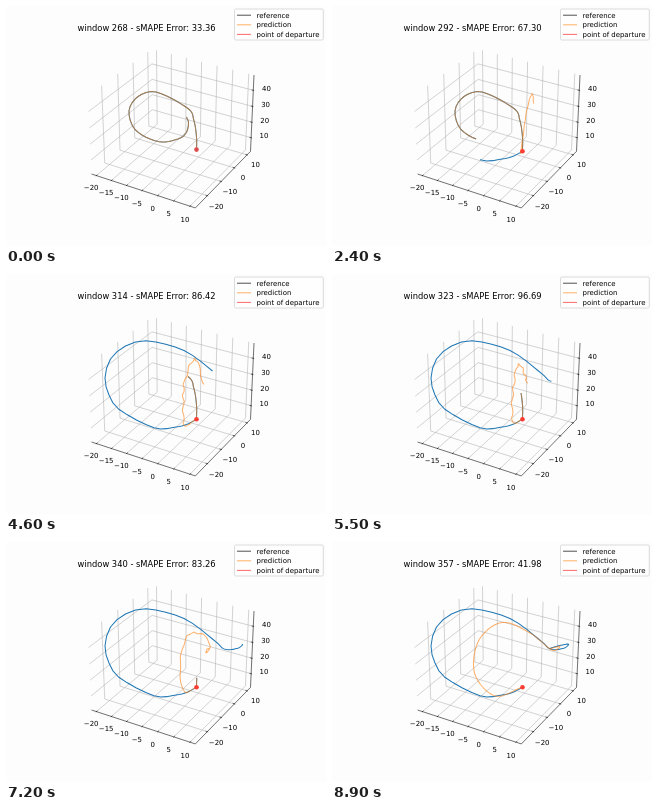
An HTML page for the animation above (9 s loop, 320 by 240 pixels).

```html
<!DOCTYPE html>
<html lang="en">
<head>
<meta charset="utf-8">
<title>Forecast window</title>
<style>
  html, body { margin: 0; width: 100%; height: 100%; overflow: hidden; background: #fdfdfd; }
  svg { display: block; width: 320px; height: 240px; }
  text { font-family: "DejaVu Sans", sans-serif; font-size: 6.94px; fill: #000; }
  #title { font-size: 8.33px; }
  .mid { text-anchor: middle; }
  .grid { stroke: #b0b0b0; stroke-width: .56; fill: none; }
  .axis { stroke: #000; stroke-width: .56; fill: none; }
  .curve { stroke-width: 1.04; fill: none; stroke-linejoin: round; }
  .ref { stroke: #1f77b4; }
  .pred { stroke: #ff7f0e; stroke-opacity: .6; }
  .start { stroke: #f33; stroke-opacity: .8; }
</style>
</head>
<body>
<svg viewBox="0 0 320 240">
  <g id="axes"></g>
  <path id="ref" class="curve ref"/>
  <path id="pred" class="curve pred"/>
  <path id="stub" class="curve start"/>
  <circle id="dot" cx="190.5" r="2.3"/>
  <text id="title" x="71.6" y="24.7"></text>
  <rect x="228.5" y="3" width="88.8" height="31" rx="1.4" fill="#fff" fill-opacity=".8" stroke="#ccc" stroke-width=".7"/>
  <path class="curve" stroke="#555" d="M231 9.2h14"/>
  <path class="curve pred" d="M231 18.8h14"/>
  <path class="curve" stroke="#f33" stroke-opacity=".7" d="M231 28.4h14"/>
  <text x="250.5" y="11.6">reference</text>
  <text x="250.5" y="21.2">prediction</text>
  <text x="250.5" y="30.8">point of departure</text>
</svg>
<script>
const $ = id => document.getElementById(id);
const line = pts => pts.length > 1 ? 'M' + pts.map(p => p.map(v => v.toFixed(2)).join(' ')).join('L') : '';

// Perspective view of the box: azimuth -60, elevation 30, distance 10
function project([x, y, z]) {
  const depth = 10 - (.433 * x - .75 * y + .5 * z);
  const u = (.866 * x + .5 * y) / depth;
  const v = (-.25 * x + .433 * y + .866 * z) / depth;
  return [71.6 + 184.8 * (u + .095) / .185, 213.6 - 184.8 * (v + .095) / .185];
}

function drawAxes() {
  const W = .5952, H = .4464, D = .0988;
  let grid = '', lines = '', labels = '';
  const path = (cls, ...pts) => `<path class="${cls}" d="${line(pts.map(project))}"/>`;
  const label = (value, pos, drop) => {
    const [x, y] = project(pos);
    labels += `<text class="mid" x="${x}" y="${y + drop}">${String(value).replace('-', '\u2212')}</text>`;
  };
  for (let t = -20; t <= 10; t += 5) {
    const x = (t + 5) * .0358;
    grid += path('grid', [x, -W, -H], [x, W, -H], [x, W, H]);
    lines += path('axis', [x, -W - .0095, -H], [x, -W + .019, -H]);
    label(t, [x, -W - D, -H - .0741], 3.8);
  }
  for (let t = -20; t <= 10; t += 10) {
    const y = (t + 7.76) * .029;
    grid += path('grid', [W, y, -H], [-W, y, -H], [-W, y, H]);
    lines += path('axis', [W + .0095, y, -H], [W - .019, y, -H]);
    label(t, [W + D, y, -H - .0741], 3.8);
  }
  for (let t = 10; t <= 40; t += 10) {
    const z = (t - 25.2) * .0185;
    grid += path('grid', [-W, -W, z], [-W, W, z], [W, W, z]);
    lines += path('axis', [W + .0095, W, z], [W - .019, W, z]);
    label(t, [W + D, W + D, z], 2.5);
  }
  lines += path('axis', [-W, -W, -H], [W, -W, -H], [W, W, -H], [W, W, H]);
  $('axes').innerHTML = grid + lines + labels;
}

// Smooth curve through [time, x, y] knots
function at(knots, t) {
  const last = knots.length - 1;
  let i = 0;
  while (i < last - 1 && t > knots[i + 1][0]) i++;
  const a = knots[i], b = knots[i + 1];
  const before = knots[Math.max(i - 1, 0)], after = knots[Math.min(i + 2, last)];
  const h = b[0] - a[0], s = (t - a[0]) / h, r = 1 - s;
  return [1, 2].map(c => {
    const m = (b[c] - before[c]) / (b[0] - before[0]) * h;
    const n = (after[c] - a[c]) / (after[0] - a[0]) * h;
    return a[c] * (1 + 2 * s) * r * r + m * s * r * r + b[c] * s * s * (3 - 2 * s) - n * s * s * r;
  });
}

const past = [
  [-89, 180.5, 111], [-84, 182.5, 117], [-78, 180, 127], [-73, 172, 133], [-67, 152, 135.5],
  [-61, 129, 123.5], [-57, 123, 105], [-53, 132, 90.5], [-49, 150, 86], [-43, 182, 102.5],
  [-38, 187.5, 113], [-25, 190.4, 130], [0, 190.5, 145]
];
const future = [
  [0, 190.5, 145], [8, 187.5, 147], [16, 179, 151], [20, 170, 153], [24, 148, 153.7],
  [28, 112.5, 135], [30, 103, 121], [32, 99, 104], [34, 104.5, 85], [36, 119.5, 72],
  [38, 140, 66.8], [42, 178, 76.5], [46, 206.5, 97], [54, 218, 106.9], [64, 231.5, 106.3],
  [72, 236.5, 102.2], [80, 227.8, 103.5], [89, 217.5, 106.5]
];

// Forecast shapes at chosen steps: knots after the departure point
const forecasts = [
  [0, [190.5, 144]],
  [16, [197, 142.5], [200.5, 118], [203.5, 97], [206.5, 95]],
  [32, [181, 149], [183.5, 127], [187.5, 102], [196, 80], [197, 100]],
  [46, [178.5, 151], [177.5, 128], [178.5, 108], [189, 84.5], [197.5, 110]],
  [64, [184, 146], [183, 123], [186.5, 102], [190, 84], [194, 113], [193, 107]],
  [80, [172, 153], [165.5, 124], [169, 97], [181, 81.5], [202, 99], [215, 108], [205, 107], [214, 104]],
  [89, [163, 154], [142.5, 131], [147, 98], [170, 80.5], [198, 91], [220, 108], [228, 104], [217, 107]]
].map(([step, ...stops]) => {
  const knots = [[190.5, step ? 145 : 143.6], ...stops].map((p, i) => [i, ...p]);
  const span = knots.length - 1;
  const rough = 1.1 * Math.exp(-(((step - 55) / 20) ** 2));
  const pts = Array.from({ length: 61 }, (_, i) => {
    const [x, y] = at(knots, i / 60 * span);
    const fade = Math.min(1, i / 12);
    return [x + rough * fade * Math.sin(i * .85), y + rough * fade * Math.sin(i * 1.3)];
  });
  return { step, pts };
});
const errors = [[0, 33.36], [16, 63.04], [32, 71.57], [38, 102.47], [46, 86.42], [64, 106.95], [80, 59.57], [89, 41.98]];

const mix = (a, b, s) => a + (b - a) * s;
function bracket(keys, step, timeOf) {
  let i = 0;
  while (i < keys.length - 2 && step > timeOf(keys[i + 1])) i++;
  const a = keys[i], b = keys[i + 1];
  return [a, b, (step - timeOf(a)) / (timeOf(b) - timeOf(a))];
}

function errorAt(step) {
  const [a, b, s] = bracket(errors, step, e => e[0]);
  return mix(a[1], b[1], s);
}

function forecastAt(step) {
  const [a, b, s] = bracket(forecasts, step, f => f.step);
  return a.pts.map((p, i) => p.map((v, c) => mix(v, b.pts[i][c], s)));
}

function range(knots, from, to) {
  const pts = [];
  for (let t = from; t <= to; t++) pts.push(at(knots, t));
  return pts;
}

function draw(step) {
  const history = range(past, step - 89, 0);
  $('ref').setAttribute('d', line(history.concat(range(future, 1, step))));
  $('pred').setAttribute('d', line(history.concat(forecastAt(step))));
  $('stub').setAttribute('d', step > 75 ? line(history) : '');
  $('dot').setAttribute('cy', step ? 145.2 : 143.6);
  $('dot').setAttribute('fill', step ? '#fb3c32' : '#dd4a4a');
  $('title').textContent = `window ${268 + step} - sMAPE Error: ${errorAt(step).toFixed(2)}`;
}

drawAxes();
const began = performance.now();
let shown = -1;
function tick() {
  const step = Math.floor((performance.now() - began) % 9000 / 100);
  if (step !== shown) draw(shown = step);
  requestAnimationFrame(tick);
}
tick();
</script>
</body>
</html>
```
